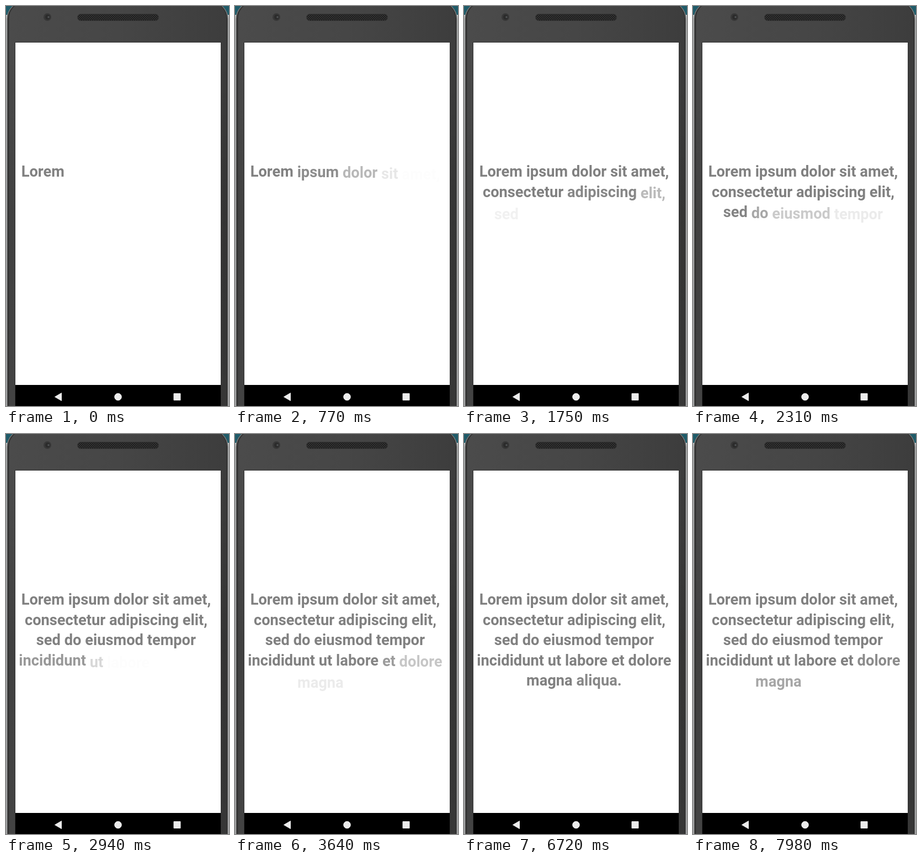
An HTML page that plays this animation: 404 by 722 pixels, repeating every 8 s.

```html
<!DOCTYPE html>
<html lang="en">
<head>
<meta charset="utf-8">
<title>Staggered text</title>
<style>
  html, body { margin: 0; width: 100%; height: 100%; overflow: hidden; }
  svg { display: block; width: 404px; height: 722px; }
  text { font: 700 27.25px Roboto, sans-serif; fill: #808080; white-space: pre; }
</style>
</head>
<body>
<svg viewBox="0 0 404 722">
  <defs>
    <linearGradient id="body">
      <stop offset="0" stop-color="#4b4b4b"/>
      <stop offset=".5" stop-color="#464646"/>
      <stop offset="1" stop-color="#3d3d3d"/>
    </linearGradient>
    <linearGradient id="shade" x2="0" y2="1">
      <stop offset="0" stop-color="#000" stop-opacity="0"/>
      <stop offset=".5" stop-color="#000" stop-opacity=".14"/>
      <stop offset="1" stop-color="#000" stop-opacity=".1"/>
    </linearGradient>
    <pattern id="mesh" width="4" height="4" patternUnits="userSpaceOnUse">
      <path d="M0 0h2v2h-2zM2 2h2v2h-2z" fill="#1d1d1d"/>
    </pattern>
  </defs>
  <rect width="404" height="722" fill="#c9cccd"/>
  <rect width="404" height="16" fill="#1f5b69"/>
  <rect x="1" y="-8" width="402" height="760" rx="32" fill="#777"/>
  <rect x="3" y="-7" width="398" height="760" rx="30" fill="#303030"/>
  <rect x="5.5" y="-6" width="393.500" height="760" rx="28" fill="url(#body)"/>
  <rect x="5.500" y="60" width="393.500" height="662" fill="url(#shade)"/>
  <circle cx="75" cy="20" r="7" fill="#383838"/>
  <circle cx="75.500" cy="20" r="4.500" fill="#2b2b2b"/>
  <circle cx="77" cy="20" r="1.800" fill="#505254"/>
  <rect x="129" y="14" width="148" height="13" rx="6.500" fill="#343434"/>
  <rect x="130" y="15" width="146" height="11" rx="5.500" fill="url(#mesh)"/>
  <rect x="16" y="65" width="374" height="657" fill="#333"/>
  <rect x="17" y="66" width="372" height="618" fill="#fff"/>
  <rect x="17" y="684" width="372" height="38" fill="#000"/>
  <g fill="#ececec" stroke="#ececec" stroke-linejoin="round">
    <path d="M88.500 705.500L100.500 698.500V712.500Z"/>
    <circle cx="203" cy="705.500" r="6.300"/>
    <rect x="304" y="699.500" width="12" height="12"/>
  </g>
  <g id="copy"></g>
</svg>
<script>
const LOOP = 8000, STEP = 70, FADE = 800, DROP = 5;
const CENTER = 202.8, SPACE = 6.8, BASELINE = 308, LEADING = 36.5;
const lines = [
  'Lorem ipsum dolor sit amet,',
  'consectetur adipiscing elit,',
  'sed do eiusmod tempor',
  'incididunt ut labore et dolore',
  'magna aliqua.'
];
// Start of each word's entrance; the first word is always there.
const enter = [-FADE, 130, 345, 550, 730, 975, 1065, 1330, 1590, 1815,
               1955, 2110, 2370, 2640, 2910, 3090, 3270, 3440, 3690];
const leave = { 16: 7830, 17: 7680, 18: 6600 };
// Ticks on which the picture stands still.
const held = [210, 630, 700, 4270, 4410, 7840];

const copy = document.getElementById('copy');
const words = [];

function addWord(str) {
  const el = document.createElementNS('http://www.w3.org/2000/svg', 'text');
  el.textContent = str;
  copy.append(el);
  words.push(el);
  return { el, width: el.getComputedTextLength() + SPACE };
}

lines.forEach((line, row) => {
  const parts = line.split(' ').map(addWord);
  let x = CENTER - parts.reduce((sum, p) => sum + p.width, 0) / 2;
  for (const { el, width } of parts) {
    el.setAttribute('x', x);
    el.setAttribute('y', BASELINE + row * LEADING);
    x += width;
  }
});

function ease(p) {
  p = Math.min(1, Math.max(0, p));
  return p < .5 ? (2 * p) ** 1.7 / 2 : 1 - (2 - 2 * p) ** 1.7 / 2;
}

function draw(now) {
  let t = Math.floor(now % LOOP / STEP) * STEP;
  while (held.includes(t)) t -= STEP;
  words.forEach((el, i) => {
    const shown = ease((t - enter[i]) / FADE) - ease((t - (leave[i] ?? LOOP)) / FADE);
    el.setAttribute('opacity', shown);
    el.setAttribute('transform', `translate(0 ${DROP * (1 - shown)})`);
  });
}

const start = performance.now();
function tick() {
  draw(performance.now() - start);
  requestAnimationFrame(tick);
}
tick();
</script>
</body>
</html>
```
